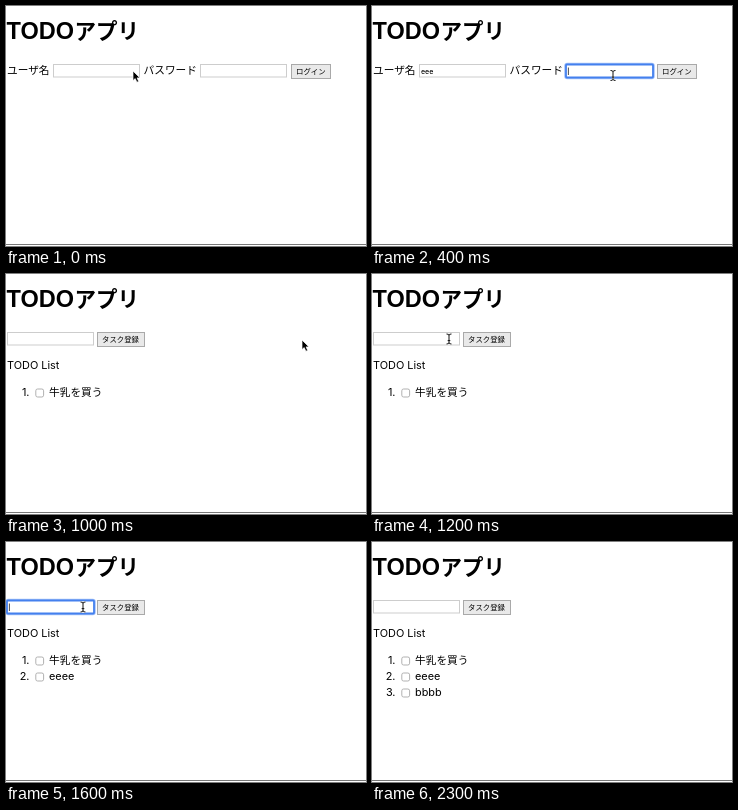
These frames come from a looping animation (360 px wide and 240 px high, 2400 ms). An HTML page:

```html
<!DOCTYPE html>
<html lang="ja">
<head>
<meta charset="utf-8">
<title>TODOアプリ</title>
<style>
html, body { margin: 0; width: 100%; height: 100%; overflow: hidden; background: #fff; }
svg { display: block; width: 100vw; height: 100vh; }
text { font: 10.7px "Noto Sans CJK JP", "Noto Sans CJK", sans-serif; white-space: pre; }
.latin { font: 10.9px Inter, "Liberation Sans", sans-serif; }
.small { font-size: 7.4px; }
.typed { font: 500 7px Inter, "Liberation Sans", sans-serif; }
.title { font-size: 21.5px; font-weight: 700; }
.title-latin { font: 700 23.5px "Liberation Sans", Arial, sans-serif; }
</style>
</head>
<body>
<svg id="stage" viewBox="0 0 360 240"></svg>
<script>
const STEP = 100, LOOP = 2400;
const EDGE = '#a9a9a9';
const stage = document.getElementById('stage');

const text = (x, y, s, cls = '', extra = '') =>
  `<text x="${x}" y="${y}" class="${cls}" ${extra}>${s}</text>`;

const rect = (x, y, w, h, fill, stroke, extra = '') =>
  `<rect x="${x}" y="${y}" width="${w}" height="${h}" fill="${fill}" stroke="${stroke}" ${extra}/>`;

function field(x, value, focused, misspelt) {
  let out = focused
    ? rect(x - .3, 58.2, 87.6, 13.6, '#fff', '#a9c5fa', 'stroke-width="3" rx="1.5"') +
      rect(x, 58.5, 87, 13, '#fff', '#4480ee', 'stroke-width="1.8" rx=".8"')
    : rect(x + .5, 58.5, 86, 12.5, '#fff', '#cdcdcd');
  out += text(x + 2, 67.6, value, 'typed');
  const end = x + 2.4 + [...value].reduce((w, c) => w + (c === 'b' ? 4.35 : 4.1), 0);
  if (misspelt) {
    out += `<path d="M${x + 2} 69.3H${end}" stroke="#e66" stroke-dasharray="1 1"/>`;
  }
  if (focused && !misspelt) {
    out += `<path d="M${end} 61.5V69" stroke="#222" stroke-width=".8"/>`;
  }
  return out;
}

const button = (x, w, label, pressed) =>
  rect(x + .5, 58.5, w - 1, 14, pressed ? '#cfcfcf' : '#e9e9e9', EDGE) +
  text(x + 5, 68.2, label, 'small');

function pointer(kind, x, y) {
  if (kind === 'arrow') {
    return `<path transform="translate(${x} ${y})" d="M0 0V9.6L2.2 7.6L3.9 11.2L5.7 10.4L4.1 6.9H7Z"
      fill="#000" stroke="#fff" stroke-width=".7"/>`;
  }
  const beam = 'M-2.5-5Q0-5 0-3.8Q0-5 2.5-5M0-4V4M-2.5 5Q0 5 0 3.8Q0 5 2.5 5M-1.3 1.6H1.3';
  return `<g transform="translate(${x} ${y})" fill="none">
    <path d="${beam}" stroke="#fff" stroke-width="2"/><path d="${beam}" stroke="#111"/></g>`;
}

const listItem = (label, i) => {
  const y = 122 + 16 * i;
  return text(23.5, y, `${i + 1}.`, 'latin', 'text-anchor="end"') +
    rect(29.8, y - 7, 7.8, 8, '#fff', EDGE, 'rx="1.8" stroke-width=".9"') +
    text(43, y, label, i ? 'latin' : '');
};

const login = s =>
  text(1, 68, 'ユーザ名') + field(47, s.user, s.focus === 'user') +
  text(137.5, 68, 'パスワード') +
  field(194, s.pass, s.focus === 'pass', s.pass === 'bbb' && s.focus === 'pass') +
  button(285, 40, 'ログイン', s.pressed);

const todo = s =>
  field(1, s.task, s.focus === 'task') + button(91, 48, 'タスク登録') +
  text(1, 95, 'TODO List', 'latin') +
  ['牛乳を買う', 'eeee', 'bbbb'].slice(0, s.items).map(listItem).join('');

// Each entry changes only the listed parts; the rest carries over.
const changes = [
  { items: 0, user: '', pass: '', task: '', focus: '', ptr: ['arrow', 127, 65] },
  { focus: 'user', ptr: ['beam', 127, 69] },
  { user: 'ee', ptr: null },
  { user: 'eee', ptr: ['beam', 241, 69.5] },
  { focus: 'pass' },
  { pass: 'bb', ptr: null },
  { pass: 'bbb', ptr: ['arrow', 295, 65.5] },
  { ptr: ['arrow', 296, 66] },
  { pressed: true },
  { items: 1, focus: '', pressed: false },
  { ptr: ['arrow', 296, 66] },
  { ptr: ['arrow', 190, 66] },
  { ptr: ['beam', 77, 65] },
  { focus: 'task' },
  { task: 'eee', ptr: null },
  { task: 'eeee', ptr: ['arrow', 127, 65] },
  { items: 2, task: '', ptr: ['beam', 77, 65] },
  { task: 'bb', ptr: null },
  { task: 'bbbb', ptr: ['arrow', 127, 65] },
  { items: 3, task: '', focus: '' },
  { ptr: ['arrow', 190, 57] },
  { ptr: ['arrow', 280, 45] },
  { ptr: ['arrow', 350, 35] },
  { ptr: null }
];
const states = [];
changes.reduce((prev, change) => {
  const next = { ...prev, ...change };
  states.push(next);
  return next;
}, {});

let shown = -1;
function draw(time) {
  const index = Math.floor(time % LOOP / STEP);
  if (index === shown) return;
  shown = index;
  const s = states[index];
  stage.innerHTML =
    text(.5, 33.3, 'TODO', 'title-latin') + text(68.5, 33, 'アプリ', 'title') +
    (s.items ? todo(s) : login(s)) +
    rect(0, 238, 360, 1, '#777', 'none') +
    (s.ptr ? pointer(...s.ptr) : '');
}

const start = performance.now();
function tick() {
  draw(performance.now() - start);
  requestAnimationFrame(tick);
}
tick();
</script>
</body>
</html>
```
